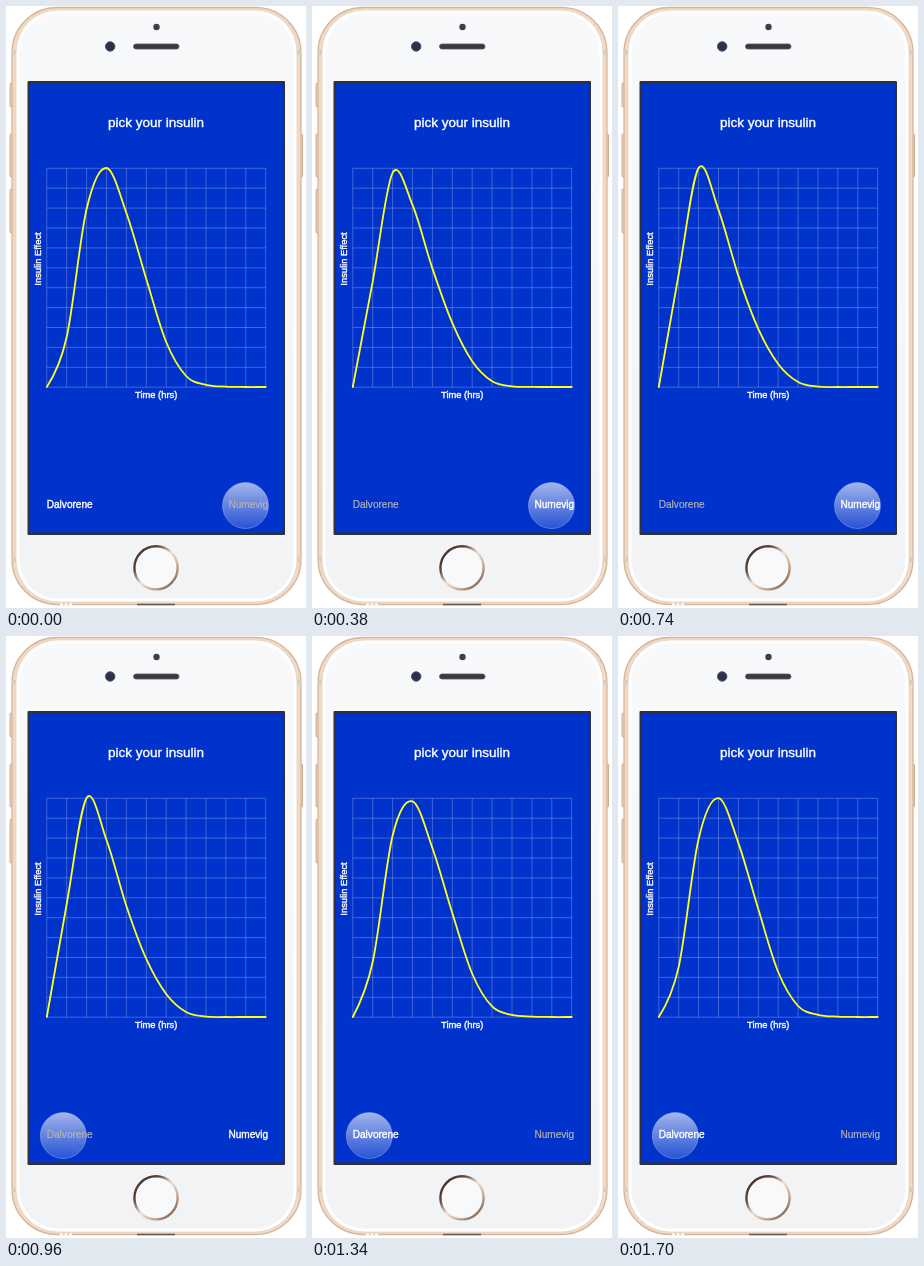
Recreate the animation shown at these times as an HTML page. Size 300 by 602 pixels, loop 1720 ms.

```html
<!DOCTYPE html>
<html lang="en">
<head>
<meta charset="utf-8">
<title>Pick your insulin</title>
<style>
  html, body { margin: 0; width: 100%; height: 100%; overflow: hidden; background: #fff; }
  svg { display: block; width: 300px; height: 602px; }
  text { font-family: "Liberation Sans", Arial, sans-serif; fill: #fff; stroke: #fff; stroke-width: .4px; }
  .axis { font-size: 9.35px; text-anchor: middle; }
  .option { font-size: 10.1px; fill: #b4b4b4; stroke: #b4b4b4; stroke-width: .2px; }
  .option.on { fill: #fff; stroke: #fff; stroke-width: .4px; }
</style>
</head>
<body>
<svg viewBox="0 0 300 602">
  <defs>
    <linearGradient id="face" x2="0" y2="1">
      <stop offset="0" stop-color="#f8f9fa"/>
      <stop offset="1" stop-color="#f1f3f5"/>
    </linearGradient>
    <linearGradient id="ring" x2="1" y2="1">
      <stop offset="0" stop-color="#3a2920"/>
      <stop offset=".28" stop-color="#5e4536"/>
      <stop offset=".5" stop-color="#f0dfd0"/>
      <stop offset=".68" stop-color="#d3b49c"/>
      <stop offset="1" stop-color="#5a4234"/>
    </linearGradient>
    <linearGradient id="glow" x2="0" y2="1">
      <stop offset="0" stop-color="#fff" stop-opacity=".64"/>
      <stop offset=".5" stop-color="#fff" stop-opacity=".39"/>
      <stop offset="1" stop-color="#fff" stop-opacity=".16"/>
    </linearGradient>
  </defs>

  <!-- phone -->
  <g fill="#ecd6c3" stroke="#c39f82" stroke-width=".8">
    <rect x="4" y="77" width="4" height="24" rx="1"/>
    <rect x="4" y="128" width="4" height="43" rx="1"/>
    <rect x="4" y="183" width="4" height="44" rx="1"/>
    <rect x="292.5" y="128" width="4" height="43" rx="1"/>
  </g>
  <rect x="6" y="1.5" width="289" height="597" rx="45" fill="#efdac8" stroke="#d9b698" stroke-width="1.3"/>
  <g fill="#d3cdc8">
    <rect x="6" y="44" width="4" height="5"/>
    <rect x="291" y="44" width="4" height="5"/>
    <rect x="6" y="551" width="4" height="5"/>
    <rect x="291" y="551" width="4" height="5"/>
  </g>
  <rect x="10" y="4" width="281" height="592" rx="42" fill="#fff" stroke="#ead2be" stroke-width=".8"/>
  <rect x="13.5" y="7.5" width="274" height="585" rx="38.5" fill="url(#face)"/>
  <path d="M131 598.5h38" stroke="#625751" stroke-width="1.6"/>
  <path d="M54 598.5h12" stroke="#fff" stroke-width="2" stroke-dasharray="3 1.5"/>

  <circle cx="150.5" cy="21" r="3.2" fill="#3f4046"/>
  <circle cx="104.2" cy="40.5" r="4.7" fill="#2d3150" stroke="#4a4d58"/>
  <rect x="127.5" y="38" width="45.5" height="5" rx="2.5" fill="#3a3b3f" stroke="#56575b" stroke-width=".8"/>
  <circle cx="150" cy="561.8" r="21.6" fill="#f8f9fa" stroke="url(#ring)" stroke-width="2.4"/>

  <!-- screen -->
  <rect x="21.5" y="75" width="257.5" height="454" rx="1" fill="#303136"/>
  <rect x="23.5" y="77.5" width="253.5" height="449" fill="#0033cc"/>
  <text x="150" y="121" font-size="13.5" text-anchor="middle">pick your insulin</text>
  <path id="grid" fill="none" stroke="#fff" stroke-opacity=".31" stroke-width=".8"/>
  <path id="curve" fill="none" stroke="#ffff1e" stroke-width="1.8" stroke-linecap="round"/>
  <text class="axis" x="150.2" y="392">Time (hrs)</text>
  <text class="axis" transform="translate(35 253) rotate(-90)">Insulin Effect</text>
  <circle id="touch" cy="499.5" r="23" fill="url(#glow)" stroke="#b9c8f5" stroke-opacity=".5" stroke-width=".8"/>
  <text class="option" id="left" x="40.7" y="501.5">Dalvorene</text>
  <text class="option" id="right" x="222.4" y="501.5">Numevig</text>
</svg>
<script>
  const LOOP = 1720, PICK_RIGHT = 100, MOVE_LEFT = 900, PICK_LEFT = 1020;
  const X0 = 40.8, Y0 = 162.3, SIZE = 218.9, CELLS = 11, STEP = SIZE / CELLS;
  const slow = [381, 331, 203, 162, 207, 273, 336, 370, 378.8, 380.6, 381, 381];
  const fast = [381, 268, 162, 204, 270, 323, 358, 376, 380.6, 381, 381, 381];
  const $ = id => document.getElementById(id);

  let lines = "";
  for (let i = 0; i <= CELLS; i++) {
    const d = i * STEP;
    lines += `M${X0 + d} ${Y0}v${SIZE}M${X0} ${Y0 + d}h${SIZE}`;
  }
  $("grid").setAttribute("d", lines);

  // critically damped spring, 0 to 1
  function spring(ms) {
    const k = Math.max(0, ms) * 0.013;
    return 1 - (1 + k) * Math.exp(-k);
  }

  // cardinal spline through evenly spaced points
  function spline(ys) {
    const pull = 1 / 6, last = ys.length - 1;
    const slope = i => i === 0 || i === last ? 0 : pull * (ys[i + 1] - ys[i - 1]);
    const dx = 2 * pull * STEP;
    let d = `M${X0} ${ys[0]}Q${X0 + STEP - dx} ${ys[1] - slope(1)} ${X0 + STEP} ${ys[1]}`;
    for (let i = 2; i <= last; i++) {
      const x = X0 + i * STEP;
      d += `C${x - STEP + dx} ${ys[i - 1] + slope(i - 1)} ${x - dx} ${ys[i] - slope(i)} ${x} ${ys[i]}`;
    }
    return d;
  }

  function draw() {
    const t = performance.now() % LOOP;
    const mix = spring(t - PICK_RIGHT) - spring(t - PICK_LEFT);
    const rightOn = t >= PICK_RIGHT && t < PICK_LEFT;
    $("curve").setAttribute("d", spline(slow.map((y, i) => y + (fast[i] - y) * mix)));
    $("touch").setAttribute("cx", t < MOVE_LEFT ? 239.5 : 57.3);
    $("right").classList.toggle("on", rightOn);
    $("left").classList.toggle("on", !rightOn);
    requestAnimationFrame(draw);
  }
  draw();
</script>
</body>
</html>
```
